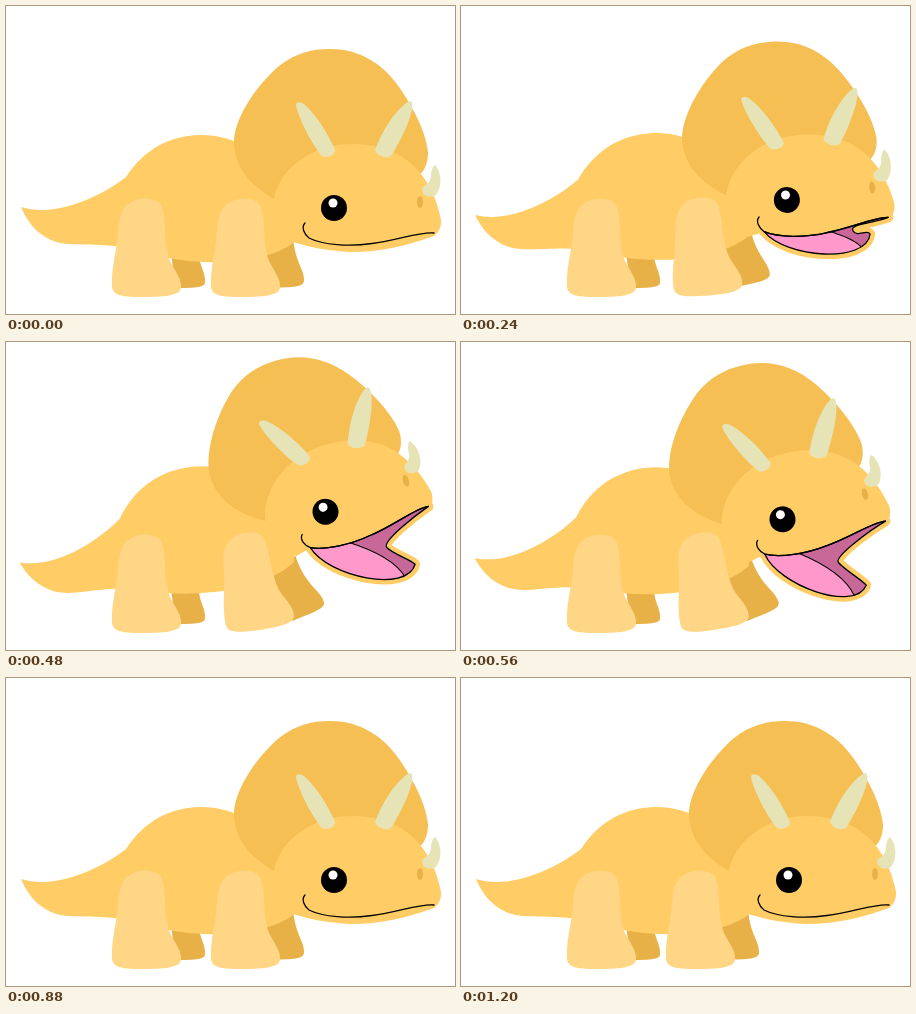
These frames come from a looping animation (449x308 px, 1.44 s). An HTML page:

```html
<!DOCTYPE html>
<html lang="en">
<head>
<meta charset="utf-8">
<title>Little dinosaur</title>
<style>
  html, body { margin: 0; width: 100%; height: 100%; overflow: hidden; background: #fff; }
  svg { display: block; width: 100vw; height: 100vh; }
  .skin { fill: #ffcc66; }
  .frill { fill: #f5bf54; }
  .near { fill: #ffd685; }
  .far { fill: #e8b148; }
  .horn { fill: #e6e4b7; }
  .rim { fill: none; stroke: #ffcc66; stroke-width: 10; stroke-linejoin: round; }
  .line { fill: none; stroke: #000; stroke-width: 1.3; stroke-linecap: round; stroke-linejoin: round; }
</style>
</head>
<body>
<svg viewBox="0 0 449 308">
  <defs>
    <path id="mouth"/>
    <clipPath id="mouthClip"><use href="#mouth"/></clipPath>
    <path id="leg" d="M120 200C127 191 150 190 155 199C161 210 157 235 164 255C168 264 176 272 175 282C174 291 150 291 135 291C115 291 106 289 106 280C105 262 111 245 112 225C113 212 115 205 120 200Z"/>
  </defs>

  <path class="far" d="M165 248L193 248C193 260 200 266 199 277C198 282 185 282 170 282Z"/>
  <path id="farLeg" class="far" d="M240 222L287 222C286 254 299 262 298 275C297 282 284 281 262 282Z"/>
  <path id="body" class="skin" d="M15 201C50 212 96 190 120 171C138 143 165 129 195 129C215 129 230 135 240 141C265 155 290 185 290 215L287 237C270 250 235 258 200 256C160 255 130 243 108 240C80 237 62 241 45 234C28 226 20 213 15 201Z"/>

  <g id="head">
    <path class="frill" d="M268 193C245 180 227 160 228 133C230 110 250 80 273 60C290 47 305 43 324 43C352 43 374 56 390 77C405 97 420 125 422 147C422 158 418 165 414 168L350 200Z"/>
    <path class="skin" d="M268 193C272 168 300 138 347 138C380 138 405 152 418 172C426 184 432 198 435 214C435 222 432 227 428 227C415 225 390 235 366 237.5C343 241 317 239 303 232L287 236C275 226 266 210 268 193Z"/>
    <path id="chin" class="skin" d="M268 193L435 214C435 222 432 227 428 230C400 240 375 246 345 246C320 245 300 240 287 236C275 226 266 210 268 193Z"/>
    <g id="cavity">
      <use href="#mouth" class="rim"/>
      <use href="#mouth" fill="#c86899"/>
      <path id="tongue" fill="#ff99cc" stroke="#000" clip-path="url(#mouthClip)"/>
      <use href="#mouth" class="line"/>
    </g>
    <path class="line" d="M299 217C295 221 298 228 303 232C317 239 343 241 366 237.5C390 235 415 225 428 227"/>

    <path class="horn" d="M290 99C290 95 295 96 298 98C310 108 322 128 329 144C329 150 321 152 316 150C308 142 292 112 290 99Z"/>
    <path class="horn" d="M406 97C409 105 395 135 385 150C380 153 371 150 369 144C376 125 390 103 402 96C404 95 406 95 406 97Z"/>
    <path class="horn" d="M429 159C435 165 437 180 430 189C425 192 417 191 416 184C417 178 424 180 425 170C425 165 427 160 429 159Z"/>
    <ellipse cx="414" cy="196" rx="3" ry="6" fill="#e8b148"/>

    <g id="eyeOpen">
      <circle cx="328" cy="202" r="13"/>
      <circle cx="327" cy="197" r="4.5" fill="#fff"/>
    </g>
    <g id="eyeSmile" transform="translate(328 202) rotate(-9.5) translate(-329 -220)">
      <path d="M315 222C320 211 337 211 340 228C333 220 322 219 315 222Z"/>
      <ellipse cx="328" cy="217.3" rx="4.2" ry="2" fill="#fff"/>
    </g>
  </g>

  <use href="#leg" class="near"/>
  <use id="nearLeg" href="#leg" class="near"/>
</svg>
<script>
const $ = id => document.getElementById(id);
const STEP = 80, LOOP = 1440;

// turn: head angle; lean: how far the body rears up; gape: jaw angle
const rest = { turn: 0, lean: 0, gape: 0 };
const low  = { turn: 9.5, lean: -0.26, gape: 0 };
const high = { turn: -18, lean: 1, gape: 11 };
const peak = { turn: -21, lean: 1.1, gape: 22 };
const roar = { turn: -13, lean: 0.7, gape: 30 };
const nod  = { turn: -3, lean: 0, gape: 0 };

const keys = [
  [0, rest], [2, low], [4, high], [5, peak], [7, roar], [9, low],
  [11, rest], [12, nod], [13, rest], [14, nod], [15, rest]
];

function poseAt(step) {
  const i = keys.findIndex(([at]) => at >= step);
  const [end, to] = keys[i], [begin, from] = keys[Math.max(0, i - 1)];
  const k = end > begin ? (step - begin) / (end - begin) : 0;
  const part = name => from[name] + (to[name] - from[name]) * k;
  return { turn: part('turn'), lean: part('lean'), gape: part('gape') };
}

function show(id, on) {
  $(id).setAttribute('visibility', on ? 'visible' : 'hidden');
}

function place(id, x, y, turn, cx, cy) {
  $(id).setAttribute('transform', `translate(${x} ${y}) rotate(${turn} ${cx} ${cy})`);
}

// The jaw swings about the corner of the mouth.
function drawMouth(gape) {
  const swing = (x, y, angle = gape) => {
    const a = angle * Math.PI / 180, c = Math.cos(a), s = Math.sin(a);
    return [303 + x * c - y * s, 232 + x * s + y * c];
  };
  const [hx, hy] = swing(92 - 0.6 * gape, 0, 0.65 * gape);
  const [tx, ty] = swing(106, 0);
  $('mouth').setAttribute('d',
    'M303 232C317 239 343 241 366 237.5C390 235 415 225 428 227' +
    `C412 232 ${hx - 3} ${hy - 7} ${hx} ${hy}` +
    `C${hx + 4} ${hy + 8} ${tx - 3} ${ty - 6} ${tx} ${ty}` +
    `C${swing(103, 30)} ${swing(22, 26)} 303 232Z`);
  $('tongue').setAttribute('d',
    `M${380 - 1.5 * gape} 238Q${hx + 3} ${hy + 10} ${swing(98, 14)}L390 320L260 300L280 190Z`);
  show('cavity', gape > 0);
  show('chin', gape === 0);
}

function draw(time) {
  const { turn, lean, gape } = poseAt(Math.min(15, Math.floor(time % LOOP / STEP)));
  const stride = Math.min(1, Math.max(0, 1.4 * lean));
  place('head', Math.min(turn / 2, 1), 1.9 * turn, turn, 328, 202);
  place('body', lean, -6 * lean, -8.5 * lean, 200, 230);
  place('nearLeg', 99 + 3 * stride, -2 * stride, -8 * stride, 137, 200);
  place('farLeg', 8 * stride, -3 * stride, -20 * stride, 270, 235);
  drawMouth(gape);
  show('eyeOpen', turn <= 6);
  show('eyeSmile', turn > 6);
}

let start;
function tick(now) {
  start ??= now;
  draw(now - start);
  requestAnimationFrame(tick);
}
draw(0);
requestAnimationFrame(tick);
</script>
</body>
</html>
```
